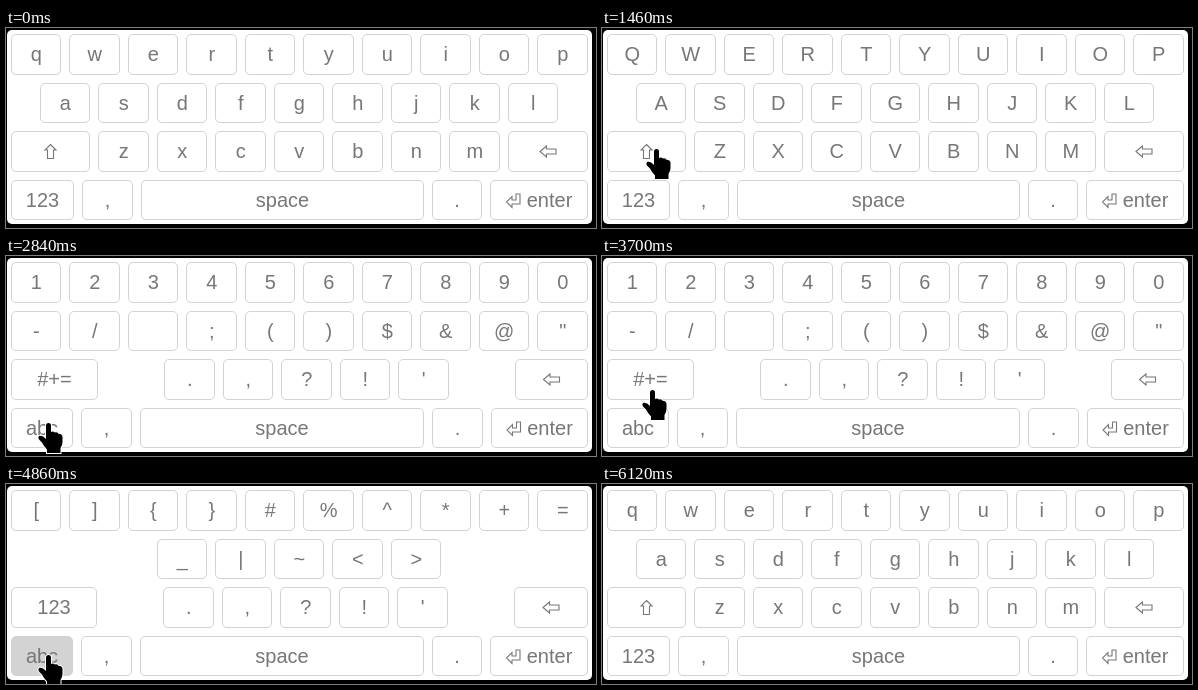
An HTML page that plays this animation: 590x200 px, repeating every 6.66 s.

```html
<!DOCTYPE html>
<html lang="en">
<head>
<meta charset="utf-8">
<title>On-screen keyboard</title>
<style>
html, body { margin: 0; width: 100%; height: 100%; overflow: hidden; background: #000; }
svg { display: block; }
text { font: 20px "Liberation Sans", Arial, sans-serif; fill: #777; text-anchor: middle; }
.key { fill: #fff; stroke: #d3d3d3; }
.icon { fill: none; stroke: #777; stroke-width: 1.1; }

.layout, .press-mid, .press-low, #hand { animation: 6660ms step-end infinite; }
.lower { animation-name: lower; }
.upper { animation-name: upper; }
.digits { animation-name: digits; }
.symbols { animation-name: symbols; }
.press-mid { animation-name: press-mid; }
.press-low { animation-name: press-low; }
#hand { animation-name: hand; fill: #000; stroke: #fff; stroke-width: 2; paint-order: stroke; }

@keyframes lower {
  0%, 31.381%, 74.624% { visibility: visible; }
  21.921%, 42.642% { visibility: hidden; }
  100% { visibility: visible; }
}
@keyframes upper {
  0%, 31.381%, 100% { visibility: hidden; }
  21.921% { visibility: visible; }
}
@keyframes digits {
  0%, 60.06%, 100% { visibility: hidden; }
  42.642% { visibility: visible; }
}
@keyframes symbols {
  0%, 74.624%, 100% { visibility: hidden; }
  60.06% { visibility: visible; }
}
@keyframes press-mid {
  0%, 21.921%, 31.381%, 60.06%, 100% { fill: #fff; }
  20.42%, 30.03%, 58.558% { fill: #d3d3d3; }
}
@keyframes press-low {
  0%, 42.642%, 74.624%, 100% { fill: #fff; }
  41.141%, 72.972% { fill: #d3d3d3; }
}
@keyframes hand {
  0% { transform: translate(306px, 300px); }
  /* in, towards shift */
  2.702% { transform: translate(306px, 182px); }
  4.309% { transform: translate(279px, 180px); }
  5.9% { transform: translate(228px, 173px); }
  7.507% { transform: translate(165px, 162px); }
  9.114% { transform: translate(110px, 150px); }
  10.705% { transform: translate(68px, 140px); }
  12.312% { transform: translate(46px, 135px); }
  13.813% { transform: translate(45px, 126px); }
  15.465% { transform: translate(44px, 121px); }
  /* down to the digits key */
  34.534% { transform: translate(37px, 148px); }
  36.186% { transform: translate(32px, 167px); }
  /* up to the symbols key */
  50.75% { transform: translate(37px, 152px); }
  52.102% { transform: translate(40px, 139px); }
  55.555% { transform: translate(40px, 134px); }
  57.057% { transform: translate(40px, 131px); }
  /* down to the letters key */
  66.666% { transform: translate(42px, 142px); }
  68.243% { transform: translate(36px, 161px); }
  69.819% { transform: translate(32px, 171px); }
  /* up and away */
  82.582% { transform: translate(32px, 152px); }
  84.234% { transform: translate(32px, 135px); }
  87.387% { transform: translate(90px, 126px); }
  88.888% { transform: translate(220px, 140px); }
  90.39% { transform: translate(343px, 166px); }
  91.891%, 100% { transform: translate(343px, 300px); }
}
</style>
</head>
<body>
<svg id="stage" width="590" height="200" viewBox="0 0 590 200">
  <rect x="1" y="2" width="585" height="194" rx="5" fill="#fff"/>
  <g id="board"></g>
  <path id="hand" d="M8 2.5Q8 0 10.5 0Q13 0 13 2.5V9Q15 7.8 17 9.5Q19 8.8 20.5 10.8Q24.5 11 24.5 14V19Q24.5 22 22.5 25V30H9V26.5Q6 23.5 4 19.5L1 16.5Q-.5 14 1.5 12.8Q4.5 12 8 16Z"/>
</svg>
<script>
const ROW_TOP = [6, 55, 103, 152];
const ROW_HEIGHT = [41, 40, 41, 40];
const PITCH = 58.5, KEY_WIDTH = 50.5;

// Icon outlines, centred on the key and on the middle of its label line
const ICONS = {
  shift: 'M0-7L5.5-1.5H3V7H-3V-1.5H-5.5Z',
  back: 'M-8 0L-1.5-5.5V-2.5H8V2.5H-1.5V5.5Z',
  enter: 'M-23-6.5h4v10h-8v3.5l-5.5-5.5 5.5-5.5v3.5h4z'
};

function add(parent, tag, attrs, label) {
  const node = document.createElementNS('http://www.w3.org/2000/svg', tag);
  for (const name in attrs) node.setAttribute(name, attrs[name]);
  if (label) node.textContent = label;
  parent.appendChild(node);
  return node;
}

function key(group, row, left, right, label, press = '') {
  const l = Math.floor(left), r = Math.floor(right), top = ROW_TOP[row];
  const mid = (left + right) / 2;
  add(group, 'rect', {
    class: 'key ' + press, x: l + .5, y: top + .5,
    width: r - l - 1, height: ROW_HEIGHT[row] - 1, rx: 4.5
  });
  if (ICONS[label]) {
    add(group, 'path', { class: 'icon', d: ICONS[label], transform: `translate(${mid} ${top + 20.5})` });
  }
  if (label === 'shift' || label === 'back') return;
  const shift = label === 'enter' ? 10.5 : 0;
  add(group, 'text', { x: mid + shift, y: top + 27 }, label);
}

function run(group, row, start, chars) {
  [...chars].forEach((char, i) => {
    const left = start + PITCH * i;
    key(group, row, left, left + KEY_WIDTH, char.trim());
  });
}

function layout(name) {
  return add(document.getElementById('board'), 'g', { class: 'layout ' + name });
}

function bottomRow(group, mode, modeEnd, enterLeft) {
  key(group, 3, 5, modeEnd, mode, 'press-low');
  key(group, 3, modeEnd + 8, modeEnd + 59, ',');
  key(group, 3, modeEnd + 67, 418, 'space');
  key(group, 3, 426, enterLeft - 8, '.');
  key(group, 3, enterLeft, 582, 'enter');
}

function letters(name, rows) {
  const group = layout(name);
  run(group, 0, 5, rows[0]);
  run(group, 1, 34, rows[1]);
  key(group, 2, 5, 84, 'shift', 'press-mid');
  run(group, 2, 92.5, rows[2]);
  key(group, 2, 502, 582, 'back');
  bottomRow(group, '123', 68, 484);
}

function signs(name, top, second, secondStart, toggle, offset) {
  const group = layout(name);
  run(group, 0, 5, top);
  run(group, 1, secondStart, second);
  key(group, 2, 5, 91 + offset, toggle, 'press-mid');
  run(group, 2, 157.5 + offset, ".,?!'");
  key(group, 2, 508 + offset, 582, 'back');
  bottomRow(group, 'abc', 67, 484 + offset);
}

const alphabet = ['qwertyuiop', 'asdfghjkl', 'zxcvbnm'];
letters('lower', alphabet);
letters('upper', alphabet.map(row => row.toUpperCase()));
signs('digits', '1234567890', '-/ ;()$&@"', 5, '#+=', 1);
signs('symbols', '[]{}#%^*+=', '_|~<>', 151, '123', 0);
</script>
</body>
</html>
```
